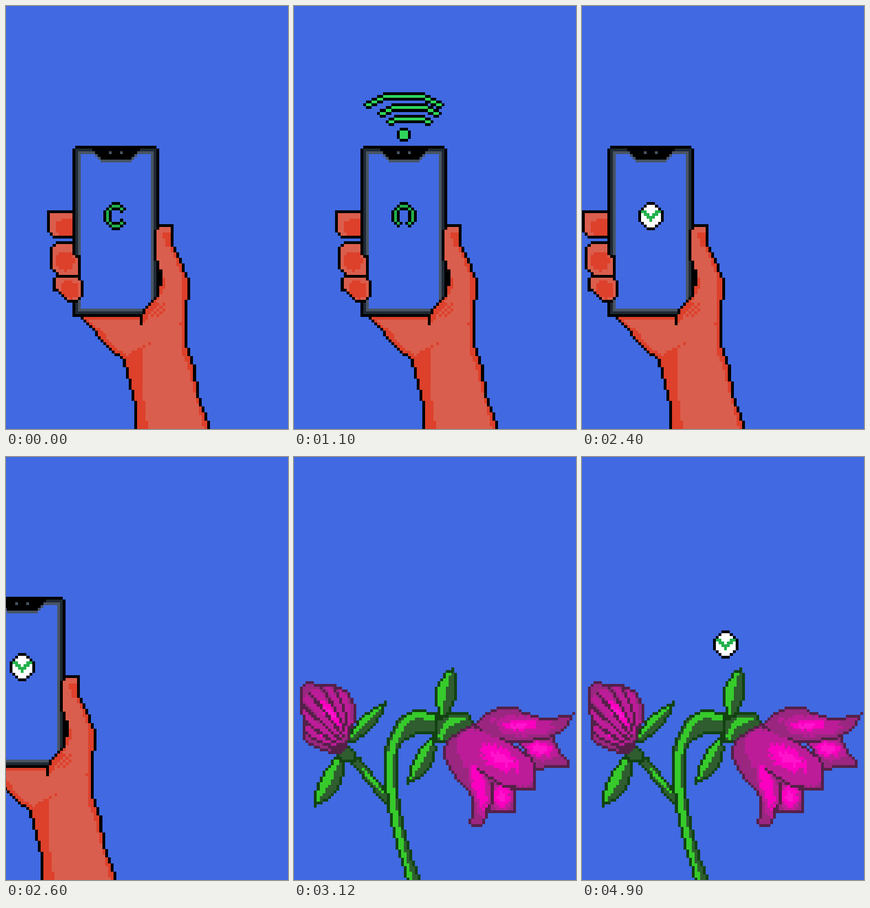
Animation of 611 by 917 pixels, one loop 5.9 s. Source, as an HTML page with a canvas:

```html
<!DOCTYPE html>
<html lang="en">
<head>
<meta charset="utf-8">
<title>Phone and flower</title>
<style>
html, body { margin: 0; width: 100%; height: 100%; overflow: hidden; background: #4169e1; }
canvas { display: block; }
</style>
</head>
<body>
<canvas id="stage" width="611" height="917"></canvas>
<script>
const W = 611, H = 917, LOOP = 5900, P = 6.08;
const BLUE = '#4169e1', BLACK = '#000', WHITE = '#fff';
const SKIN = '#da5e4d', RED = '#dd402b', DARK = '#1f2933', GRAY = '#485464';
const LEAF = '#2f5d2f', LIME = '#36cb2b', PINE = '#124212';
const PLUM = '#542048', MAUVE = '#9a2680', ROSE = '#bd1c98', PINK = '#fb00c0', HOT = '#ff14cc';
const SPIN = '#22b14c', WIFI = '#2fd65c';

function newCanvas() {
  const canvas = document.createElement('canvas');
  canvas.width = W;
  canvas.height = H;
  return canvas;
}

function square(c, x0, y0, i, j, color) {
  const x = Math.round(x0 + i * P), y = Math.round(y0 + j * P);
  c.fillStyle = color;
  c.fillRect(x, y, Math.round(x0 + (i + 1) * P) - x, Math.round(y0 + (j + 1) * P) - y);
}

let seed = 7;
function random() {
  seed = seed * 16807 % 2147483647;
  return seed / 2147483647;
}

const scratch = newCanvas().getContext('2d', { willReadFrequently: true });

// A layer of big square pixels; paths are given in stage coordinates.
function makeLayer(x0, y0) {
  const canvas = newCanvas(), c = canvas.getContext('2d');
  let interior = new Set();
  const cell = (i, j, color) => square(c, x0, y0, i, j, color);

  function mask(d, width, filled) {
    const path = new Path2D(d);
    scratch.clearRect(0, 0, W, H);
    scratch.lineWidth = width;
    if (filled) scratch.fill(path);
    if (width) scratch.stroke(path);
    const data = scratch.getImageData(0, 0, W, H).data;
    return (i, j) => {
      const x = Math.min(W - 1, Math.max(0, Math.floor(x0 + (i + .5) * P)));
      const y = Math.min(H - 1, Math.max(0, Math.floor(y0 + (j + .5) * P)));
      return data[(y * W + x) * 4 + 3] > 127;
    };
  }
  function each(test, visit) {
    for (let j = Math.floor(-y0 / P); j < (H - y0) / P; j++)
      for (let i = Math.floor(-x0 / P); i < (W - x0) / P; i++)
        if (test(i, j)) visit(i, j);
  }
  // Outlined shape; its interior limits the shading that follows.
  function outline(test, color, edge) {
    interior = new Set();
    each(test, (i, j) => {
      const inner = test(i - 1, j) && test(i + 1, j) && test(i, j - 1) && test(i, j + 1);
      if (inner) interior.add(i + ',' + j);
      cell(i, j, inner ? color : edge);
    });
  }
  const isInner = (i, j) => interior.has(i + ',' + j);
  return {
    canvas,
    shape: (d, color, edge) => outline(mask(d, 4, true), color, edge),
    ribbon: (d, width, color, edge) => outline(mask(d, width, false), color, edge),
    shade(d, color, checker) {
      const test = mask(d, 0, true);
      each((i, j) => test(i, j) && isInner(i, j) && !(checker && (i + j) % 2),
        (i, j) => cell(i, j, color));
    },
    streak(d, width, color) {
      const test = mask(d, width, false);
      each((i, j) => test(i, j) && isInner(i, j), (i, j) => cell(i, j, color));
    },
    patch: (d, color) => each(mask(d, 0, true), (i, j) => cell(i, j, color)),
    // Elliptic glow; colors run from the centre outwards.
    glow(cx, cy, rx, ry, turn, colors, rough = .2) {
      const co = Math.cos(turn), si = Math.sin(turn);
      each(isInner, (i, j) => {
        const dx = x0 + (i + .5) * P - cx, dy = y0 + (j + .5) * P - cy;
        const r = Math.hypot((dx * co + dy * si) / rx, (dy * co - dx * si) / ry);
        const k = Math.floor((r + (random() - .5) * rough) * colors.length);
        if (k < colors.length) cell(i, j, colors[Math.max(0, k)]);
      });
    },
    block(i, j, w, h, color) {
      for (let b = 0; b < h; b++) for (let a = 0; a < w; a++) cell(i + a, j + b, color);
    }
  };
}

function drawHand() {
  const g = makeLayer(144, 303);

  // Phone
  g.block(1, 0, 29, 61, BLACK);
  g.block(0, 1, 31, 60, BLACK);
  [DARK, GRAY, BLUE].forEach((color, k) => g.block(k + 1, k + 1, 29 - 2 * k, 59 - 2 * k, color));
  for (let k = 0; k < 3; k++) g.block(8 + k, 3 + k, 15 - 2 * k, 1, GRAY);
  for (let k = 0; k < 4; k++) g.block(7 + k, 1 + k, 17 - 2 * k, 1, BLACK);
  g.block(13, 2, 1, 1, GRAY);
  g.block(17, 2, 1, 1, GRAY);

  // Fingers
  g.shape('M149 443H95L89 449V490L113 503H149Z', SKIN, BLACK);
  g.glow(134, 480, 28, 20, 0, [RED], 0);
  g.shape('M113 509H149V537L162 547V576L150 586H113L95 563V526Z', SKIN, BLACK);
  g.glow(128, 553, 20, 21, 0, [RED], 0);
  g.shape('M113 582H156L168 600V630L150 642H138L101 612V594Z', SKIN, BLACK);
  g.glow(138, 615, 21, 19, .6, [RED], 0);

  // Thumb, palm and arm
  g.shape('M156 669L236 754L254 766L278 862V930H446L436 898L418 850L407 782L394 740V635H399V594' +
          'L391 585L381 552L363 521V480L357 475H338L321 492V548L327 552V630L297 660V669Z', SKIN, BLACK);
  g.shade('M339 492H357V521H345Z', RED);
  g.streak('M360 523L389 590V630L384 640V740L402 790L434 917', 10, RED);
  g.streak('M160 675H292', 9, RED);
  g.streak('M165 677L256 766', 16, RED);
  g.shade('M345 580V606L321 654L297 690V660L327 636Z', RED);
  g.shade('M321 642H346V660L333 676H312V654Z', RED, true);
  g.shade('M250 764L296 736V830L309 920H270Z', RED);
  g.block(25, 71, 1, 1, RED);
  g.block(27, 70, 1, 1, RED);
  g.block(38, 63, 1, 1, RED);
  g.block(24, 60, 1, 4, BLACK);
  g.block(31, 44, 1, 6, BLACK);
  return g.canvas;
}

function drawFlower() {
  const g = makeLayer(13, 455.5);

  // Lens from base to tip, bulging by l to its lit side and r to the other
  function leaf(x1, y1, x2, y2, l, r) {
    const len = Math.hypot(x2 - x1, y2 - y1);
    const nx = (y2 - y1) / len, ny = (x1 - x2) / len;
    const side = b => `${(x1 + x2) / 2 + nx * b} ${(y1 + y2) / 2 + ny * b}`;
    g.shape(`M${x1} ${y1}Q${side(l)} ${x2} ${y2}Q${side(-r)} ${x1} ${y1}Z`, LEAF, PINE);
    g.shade(`M${x1} ${y1}Q${side(l)} ${x2} ${y2}Q${side((l - r) / 2)} ${x1} ${y1}Z`, LIME);
  }

  // Branch and main stem
  g.ribbon('M132 657L207 748', 23, LEAF, PINE);
  g.streak('M148 676L194 728', 7, LIME);
  g.shape('M250 930C226 860 196 760 196 660C200 600 230 550 265 550Q295 549 318 563V600' +
          'Q240 592 225 635C214 700 228 800 278 930Z', LEAF, PINE);
  g.streak('M256 930C234 860 206 760 208 660C212 610 236 562 270 560L312 565', 13, LIME);

  leaf(114, 622, 200, 531, 30, 32);
  leaf(102, 645, 44, 756, -30, -58);
  g.shape('M97 645L112 622L133 640V663H100Z', LEAF, PINE);
  leaf(321, 568, 344, 457, 50, 38);
  leaf(302, 603, 247, 706, -22, -52);
  g.shape('M304 562L320 566L340 557L376 554L388 577V586L350 616L335 622L309 615Z', LEAF, PINE);
  g.shade('M338 562H374L366 570L332 590L320 612L311 606L322 586Z', LIME);

  // Bud: ribs run from the rim to the base, with a bright band beside each
  g.shape('M20 492Q40 487 62 494Q100 491 120 516Q146 555 122 590Q114 640 98 641' +
          'Q40 638 21 606Q16 585 25 572Q10 550 14 520Z', MAUVE, PLUM);
  const rib = k => {
    const a = (155 + 26 * k) * Math.PI / 180, bulge = (k - 2.5) * 4;
    const sx = 70 + 62 * Math.cos(a), sy = 560 + 62 * Math.sin(a);
    const ex = 92 + 5 * k, ey = 630 - 8 * k;
    return `M${sx} ${sy}Q${(sx + ex) / 2 + bulge} ${(sy + ey) / 2 - bulge} ${ex} ${ey}`;
  };
  for (let k = 0; k < 6; k++) g.streak(rib(k + .5), 12, ROSE);
  g.glow(78, 555, 52, 17, .85, [HOT, PINK, ROSE]);
  g.glow(52, 597, 24, 9, .6, [PINK, ROSE]);
  for (let k = 0; k < 6; k++) g.streak(rib(k), 6, PLUM);
  g.glow(102, 634, 22, 14, -.5, [PLUM], 0);

  // Bloom, from the back petals to the front
  g.shape('M490 618L560 605Q575 645 592 657V671L525 677Z', MAUVE, PLUM);
  g.glow(532, 632, 42, 24, .3, [HOT, PINK, ROSE]);
  g.shape('M384 590C420 545 450 535 480 542C520 572 570 568 604 557Q590 610 520 614Q470 624 440 612L400 605Z', MAUVE, PLUM);
  g.glow(490, 582, 72, 22, 0, [HOT, PINK, ROSE, ROSE]);
  g.shape('M424 695L478 718V768H424Z', MAUVE, PLUM);
  g.glow(450, 736, 24, 36, 0, [HOT, PINK, ROSE]);
  g.shape('M388 580C340 605 312 625 330 662Q345 690 388 738V780L382 784V796L394 801H406L416 782V765' +
          'L430 752V700Q450 718 524 721V668Q490 622 425 600Z', MAUVE, PLUM);
  g.glow(380, 640, 24, 46, -.3, [ROSE]);
  g.glow(445, 652, 92, 46, .55, [HOT, PINK, ROSE, ROSE]);
  g.glow(402, 715, 20, 74, -.25, [PINK, PINK, ROSE]);
  g.patch('M396 583L440 573L446 606L420 604Z', MAUVE);
  g.streak('M398 678L430 697L450 712', 6, PLUM);
  return g.canvas;
}

const ctx = document.getElementById('stage').getContext('2d');
const hand = drawHand(), flower = drawFlower();

// Round icon of 9 by 10 squares; paint picks a color from depth and position
function badge(x, y, paint) {
  for (let j = 0; j < 10; j++)
    for (let i = 0; i < 9; i++) {
      const rim = Math.min(j, 9 - j), dx = i - 4;
      const depth = Math.min(rim, Math.min(4, 1 + rim) - Math.abs(dx));
      const color = depth >= 0 && paint(depth, dx, j);
      if (color) square(ctx, x, y, i, j, color);
    }
}

function check(x, y) {
  badge(x, y, (depth, dx, j) => {
    if (depth === 0 && Math.abs(dx) !== 3) return BLACK;
    const fall = j + Math.abs(dx);
    if (depth > 0 && j > 2 && (fall === 5 || fall === 6)) return SPIN;
    return depth ? WHITE : BLACK;
  });
}

// Ring with a gap facing right, down, left or up
function spinner(x, y, turn) {
  const ux = [1, 0, -1, 0][turn], uy = [0, 1, 0, -1][turn];
  badge(x, y, (depth, dx, j) => {
    const dy = j - 4.5;
    const ahead = dx * ux + dy * uy, aside = Math.abs(dx * uy - dy * ux);
    if (ahead > 1 && aside < (depth === 2 ? 1 : 2)) return null;
    return [BLACK, SPIN, BLACK][depth];
  });
}

function arc(x, y, drop) {
  const last = 6 * drop + 10;
  for (let i = 0; i <= last; i++) {
    const e = Math.min(i, last - i);
    const d = Math.max(0, drop - Math.floor((e - 1) / 2));
    if (!e) square(ctx, x, y, i, drop + 1, BLACK);
    else [BLACK, WIFI, BLACK].forEach((color, k) => square(ctx, x, y, i, d + k, color));
  }
}

// Level 1 is the dot alone, each further level adds an arc
function wifi(x, y, level) {
  if (level > 0)
    for (let j = 0; j < 5; j++)
      for (let i = 0; i < 5; i++) {
        const sideX = i % 4 === 0, sideY = j % 4 === 0;
        if (!(sideX && sideY)) square(ctx, x + 12 * P, y + 76.7, i, j, sideX || sideY ? BLACK : WIFI);
      }
  for (let drop = 1; drop < level; drop++)
    arc(x + [0, 8, 5, 0][drop] * P, y + (3 - drop) * 4 * P, drop);
}

function handShift(t) {
  if (t < 2300) return 0;
  if (t >= 2800) return 311 + 109 * Math.floor((t - 2800) / 80);
  const k = Math.floor((t - 2300) / 50) + 1;
  return Math.round(30.2 * k - .174 * k * k);
}

function draw(t) {
  ctx.fillStyle = BLUE;
  ctx.fillRect(0, 0, W, H);
  if (t < 3120) {
    const shift = handShift(t);
    ctx.drawImage(hand, -shift, 0);
    if (t < 1800) {
      const phase = Math.floor(t / 100) % 6;
      spinner(211, 425, phase % 4);
      wifi(150, 187, Math.min(phase, 4));
    } else {
      check(211 - shift, 425);
    }
  }
  if (t >= 2800) {
    const left = Math.max(0, 4 - Math.floor((t - 2800) / 80)) / 4;
    ctx.drawImage(flower, Math.round(437 * left), Math.round(18 * left));
  }
  if (t >= 4900) check(284, 376);
  else if (t >= 3700) wifi(217, 318.5, 2 + Math.floor((t - 3700) / 200) % 3);
}

const start = performance.now();
function tick() {
  draw((performance.now() - start) % LOOP);
  requestAnimationFrame(tick);
}
tick();
</script>
</body>
</html>
```
